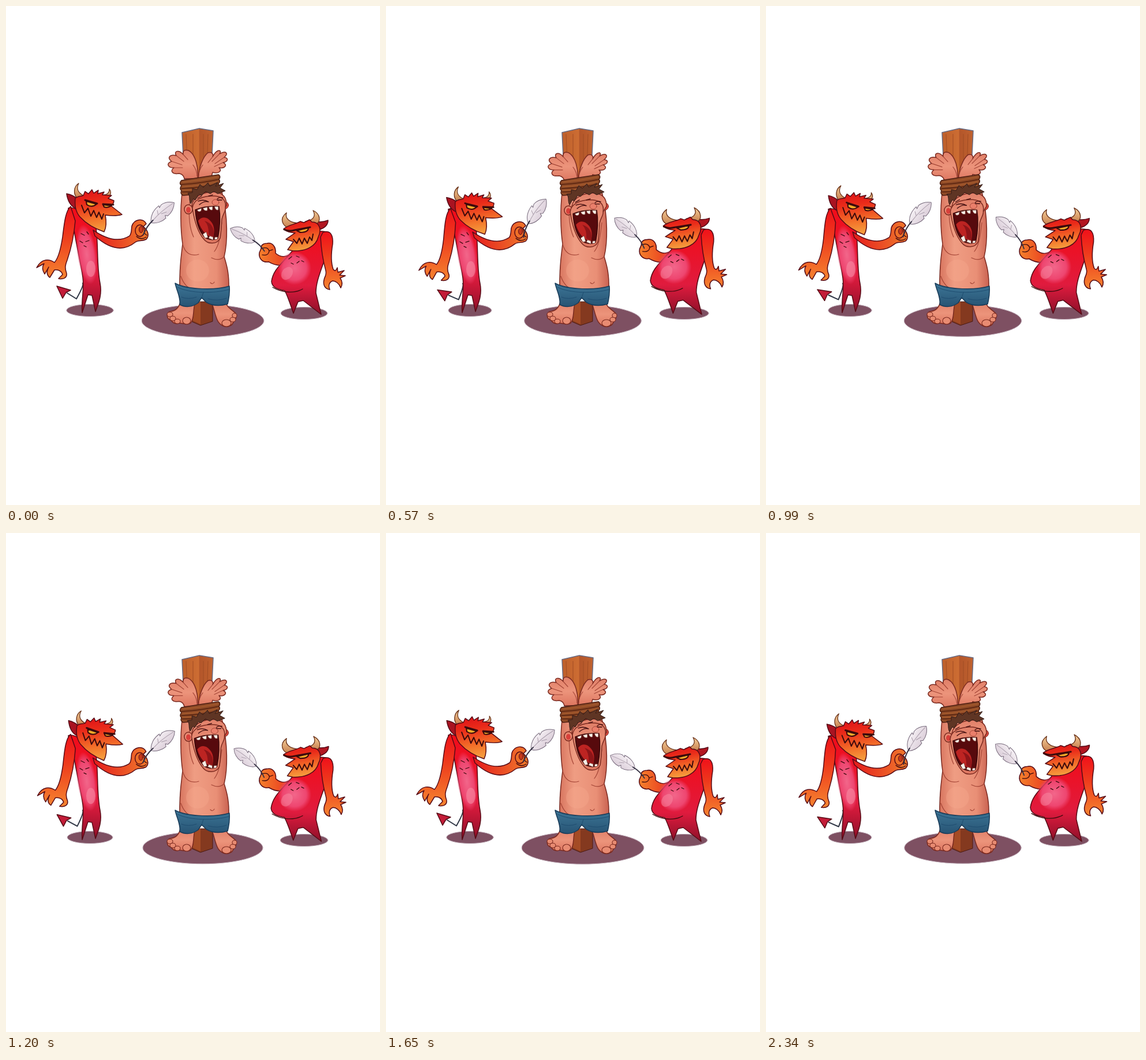
These frames come from a looping animation (648 by 864 pixels, 2.37 s). An HTML page:

```html
<!DOCTYPE html>
<html lang="en">
<head>
<meta charset="utf-8">
<title>Tickle</title>
<style>
html, body { margin: 0; width: 100%; height: 100%; overflow: hidden; background: #fff; }
svg { display: block; width: 648px; height: 864px; }
path, ellipse, circle { stroke-linejoin: round; stroke-linecap: round; }
.shadow { fill: #7e5062; stroke: #b9a3b0; stroke-width: 1; }
.red { stroke: #570b16; stroke-width: 1.5; }
.skin { fill: url(#skin); stroke: #7b2a20; stroke-width: 1.5; }
.crease { fill: none; stroke: #a54637; stroke-width: 1.2; }
.ink { fill: none; stroke: #3c0a0c; stroke-width: 2; }
.fine { stroke-width: 1.3; }
.bold { stroke-width: 3; }
.horn { fill: url(#horn); stroke: #683018; stroke-width: 1.3; }
.eye { fill: #f2a928; stroke: #37080c; stroke-width: 2; }
.tooth { fill: #f4eee6; stroke: #6d2b23; stroke-width: .7; }
.toe { fill: #e88b72; stroke: #7b2a20; stroke-width: 1.1; }
</style>
</head>
<body>
<svg viewBox="0 0 648 864">
<defs>
  <linearGradient id="skin" x2="0" y2="1"><stop stop-color="#e07f68"/><stop offset=".5" stop-color="#ec947b"/><stop offset="1" stop-color="#dd7660"/></linearGradient>
  <linearGradient id="torso"><stop stop-color="#d8755f"/><stop offset=".3" stop-color="#ef9d83"/><stop offset=".75" stop-color="#e98f76"/><stop offset="1" stop-color="#c96251"/></linearGradient>
  <linearGradient id="wood"><stop stop-color="#bd5f2b"/><stop offset=".54" stop-color="#cd6d33"/><stop offset=".56" stop-color="#b3562a"/><stop offset="1" stop-color="#c0622f"/></linearGradient>
  <linearGradient id="denim" x2="0" y2="1"><stop stop-color="#3c7596"/><stop offset="1" stop-color="#275474"/></linearGradient>
  <linearGradient id="body" x2="0" y2="1"><stop stop-color="#f20c18"/><stop offset=".65" stop-color="#e01b3e"/><stop offset="1" stop-color="#8c1029"/></linearGradient>
  <linearGradient id="limb" x2="0" y2="1"><stop stop-color="#f0101a"/><stop offset=".4" stop-color="#ee3a1c"/><stop offset="1" stop-color="#f58530"/></linearGradient>
  <linearGradient id="reach"><stop stop-color="#e51b1c"/><stop offset="1" stop-color="#f07a2c"/></linearGradient>
  <linearGradient id="reachBack"><stop stop-color="#f4802c"/><stop offset="1" stop-color="#e8321e"/></linearGradient>
  <linearGradient id="face" x2=".2" y2="1"><stop stop-color="#dc0e17"/><stop offset=".35" stop-color="#ea2c1a"/><stop offset=".75" stop-color="#f3722a"/><stop offset="1" stop-color="#f59a3c"/></linearGradient>
  <linearGradient id="horn" x2="0" y2="1"><stop stop-color="#f3cc98"/><stop offset="1" stop-color="#c67c4a"/></linearGradient>
  <linearGradient id="plume"><stop stop-color="#f5f0f4"/><stop offset="1" stop-color="#dccfda"/></linearGradient>
  <radialGradient id="glow"><stop stop-color="#f2668a"/><stop offset=".7" stop-color="#ee4670"/><stop offset="1" stop-color="#ee4670" stop-opacity="0"/></radialGradient>
  <g id="feather">
    <path fill="url(#plume)" stroke="#75687a" d="M-3,-17C-11,-24 -14,-36 -11,-48L-8,-46L-9,-52C-7,-60 0,-66 6,-69C12,-62 14,-52 12,-44L8,-42L12,-39C11,-30 5,-21 -1,-18Z"/>
    <path fill="none" stroke="#a99caa" d="M-3,-18Q-3,-42 5,-66M-2,-35L-8,-40M6,-48L1,-40"/>
    <path fill="none" stroke="#363244" stroke-width="2" d="M0,8Q-5,-6 -3,-22"/>
  </g>
</defs>

<ellipse id="shadowL" class="shadow" cx="145.5" cy="527" ry="10.5"/>
<ellipse id="shadowM" class="shadow" cx="341" cy="545"/>
<ellipse id="shadowR" class="shadow" cx="516.5" cy="532" ry="10.5"/>

<g id="boy">
  <path fill="url(#wood)" stroke="#686a82" stroke-width="1.5" d="M305,219L335,212L359,216L355,300L309,300Z"/>
  <path fill="none" stroke="#a04c24" d="M312,222L314,270M324,222V262M342,222V268M350,222L348,285"/>
  <path fill="#84391f" stroke="#4a1a12" d="M322,512H358V546L337,553L321,546Z"/>
  <path fill="#a44b25" d="M324,512H337V551L324,545Z"/>
  <path fill="url(#torso)" stroke="#7b2a20" stroke-width="1.5" d="M305,324C302,350 302,385 306,412C304,430 300,450 301,493C320,503 370,502 386,492C387,465 383,450 378,434C384,410 385,365 374,322Z"/>
  <path class="crease" d="M306,412C310,428 320,434 334,430M378,434C372,440 364,440 356,436M318,340C316,365 318,385 325,400M374,375C371,400 369,415 361,425M354,479Q358,483 361,478M303,468Q309,486 324,492"/>
  <ellipse cx="332" cy="458" rx="20" ry="19" fill="#f4a88d" opacity=".4"/>
  <g id="hands" class="skin">
    <path d="M332,300C334,280 328,257 316,251C309,249 306,252 307,258C299,249 290,252 295,260C284,257 278,264 287,270C277,273 280,281 291,281C283,287 289,293 300,291C306,292 308,295 309,300Z"/>
    <path d="M333,300C334,280 342,261 350,255C356,253 360,257 358,262C366,247 375,250 370,257C382,250 386,257 378,263C387,264 384,271 376,272C385,276 379,283 369,281C376,287 367,292 358,289L355,300Z"/>
    <path class="crease" d="M307,258L315,267M295,260L308,270M287,270L305,276M291,281L306,281M324,276Q331,285 331,296M358,262L350,272M370,257L357,270M378,263L362,274M376,272L361,279M341,276Q334,285 334,296"/>
  </g>
  <path fill="#8f4a27" stroke="#4b1e12" stroke-width="1.5" d="M304,302Q335,297 368,292Q373,295 369,300Q372,304 368,308Q371,313 367,318Q340,326 307,328Q301,325 304,320Q300,316 304,311Q299,307 304,302Z"/>
  <path fill="none" stroke="#56230f" stroke-width="1.6" d="M304,309Q338,307 369,300M304,316Q338,315 368,308M305,322Q340,322 368,314"/>
  <path fill="none" stroke="#b3652f" d="M306,305Q338,302 367,296M306,313Q338,311 367,304M306,319Q338,319 366,311"/>
  <path class="skin" d="M302,512H328C323,528 327,540 320,549C312,553 306,549 300,549C292,552 288,547 286,544C278,542 277,532 284,529C294,528 300,522 302,512Z"/>
  <path class="skin" d="M356,512H380C384,525 394,526 399,534C400,542 396,544 394,547C392,555 380,558 373,552C364,547 363,532 356,512Z"/>
  <g class="toe">
    <ellipse cx="284" cy="534" rx="5" ry="4"/><ellipse cx="289" cy="541" rx="5" ry="4"/><ellipse cx="297" cy="546" rx="5" ry="4"/><ellipse cx="313" cy="545" rx="7" ry="6"/>
    <ellipse cx="396" cy="536" rx="4" ry="4"/><ellipse cx="393" cy="543" rx="5" ry="4"/><ellipse cx="382" cy="549" rx="8" ry="6"/>
  </g>
  <path fill="url(#denim)" stroke="#193b58" stroke-width="1.5" d="M293,480C315,492 365,492 387,485C388,497 386,508 384,516C370,520 357,519 347,513L339,505L333,514C322,522 310,522 301,517C303,505 296,494 293,480Z"/>
  <path fill="none" stroke="#1f4d70" d="M297,487C320,498 360,498 386,491M342,496L339,505M304,504Q316,509 330,504M382,506Q366,512 350,507"/>
  <g id="hair">
    <circle cx="379" cy="345" r="6.5" fill="#d9493f" stroke="#7b2a20"/>
    <ellipse class="skin" cx="316" cy="352" rx="7" ry="8"/><ellipse cx="316" cy="353" rx="4" ry="5" fill="#d8403b"/>
    <path class="skin" d="M322,345C325,328 345,321 362,322C378,324 382,333 382,345L370,365L330,363Z"/>
  </g>
  <g id="face1">
    <path class="skin" d="M323,350C324,336 340,328 362,329C376,330 382,338 380,349C381,356 376,359 374,369C373,382 373,392 371,402C366,413 350,413 343,404C332,391 326,370 323,350Z"/>
    <path fill="#570a0d" stroke="#38080a" stroke-width="1.5" d="M328,353C340,348 355,346 369,347C372,365 370,387 367,402C360,406 349,405 343,399C332,386 329,370 328,353Z"/>
    <path fill="#bd2422" d="M333,372C340,363 349,366 354,372C361,379 362,389 359,400C349,399 338,390 333,372Z"/>
    <path fill="#8d1518" d="M344,372Q352,380 351,396L359,399C362,386 357,376 344,372Z"/>
    <path class="tooth" d="M331,353L339,350L338,355Q333,358 331,353ZM341,350L349,348L349,354Q344,356 341,350ZM351,348L358,347L358,353Q353,355 351,348ZM361,347L368,347L368,353Q363,355 361,347ZM341,395L347,391L350,401L345,402ZM351,402L353,398L359,400L359,405ZM361,404L362,400L367,400L366,404Z"/>
    <ellipse cx="363" cy="340" rx="6" ry="5" fill="#ea7f6b" stroke="#a54637"/>
    <path class="ink fine" d="M333,338Q342,334 351,339M335,344Q343,337 351,339M332,333L339,329M366,334Q370,330 376,332M366,336L374,336M351,329L358,327"/>
  </g>
  <path id="locks" fill="#5f3524" stroke="#321b18" d="M320,342C316,336 320,329 315,324L323,323L323,316L331,318L336,309L342,314L350,306L353,312L367,305L363,312L377,307L371,315L380,320L367,325L360,321L354,325L346,321L339,328L334,326L328,336L325,334Z"/>
</g>

<g id="slim">
  <g id="tail">
    <path fill="none" stroke="#303746" stroke-width="2" d="M133,480Q135,484 122,507L106,497"/>
    <path class="red" fill="#c31c38" d="M88,485L112,492L104,496L98,506Z"/>
  </g>
  <path class="red" fill="url(#body)" d="M108,350C120,345 150,368 156,385C160,410 157,450 163,480C167,500 160,515 155,529L149,501L142,500L132,531C130,510 136,490 133,470C129,440 118,400 116,372C112,362 108,358 108,350Z"/>
  <ellipse cx="140" cy="430" rx="17" ry="52" transform="rotate(-8 140 430)" fill="url(#glow)"/>
  <ellipse cx="147" cy="455" rx="8" ry="14" fill="#f78aa2" opacity=".6"/>
  <path class="ink fine" d="M130,394L136,397M140,391L143,395M128,407L133,410M138,408L144,406M135,415L139,417"/>
  <path id="armL" class="red" fill="url(#limb)" d="M112,347C103,355 101,375 98,400C95,420 91,436 84,444C75,438 62,436 53,453L66,446C62,452 63,458 67,464L74,452C70,460 70,466 76,470L84,457C92,456 97,460 98,465L91,472C100,474 106,470 105,463C102,455 102,450 106,440C113,420 118,395 120,372Z"/>
  <g id="reachL">
    <path class="red" fill="url(#reach)" d="M151,388C173,403 195,410 214,398C218,394 217,387 218,381C222,369 237,366 243,377L238,382C246,388 249,398 243,404C235,408 229,405 224,409C208,422 186,427 154,398Z"/>
    <ellipse cx="232" cy="389" rx="8" ry="10" fill="#ee6f28" stroke="#570b16" stroke-width="1.5"/>
    <ellipse cx="234" cy="387" rx="3.5" ry="5.5" fill="#c63a1d" stroke="#570b16"/>
    <path class="ink fine" d="M226,399Q234,406 243,400M239,393L244,397"/>
    <use id="featherL" href="#feather"/>
  </g>
  <g id="headL">
    <path class="red" fill="#a91321" d="M105,325Q116,327 124,334L120,350Q108,344 105,325Z"/>
    <path class="horn" d="M126,307C121,317 126,324 134,328L124,333C116,326 117,313 126,307Z"/>
    <path class="horn" d="M179,317C180,325 173,327 166,328L172,334C181,331 184,323 179,317Z"/>
    <path class="red" fill="url(#face)" d="M120,333C125,328 130,330 134,328L137,321L143,325L149,318L152,324L160,319L159,325L170,322L167,327L183,328L177,333L187,337C187,341 185,344 182,346L201,361C192,364 180,363 172,362C174,372 174,383 170,391C155,386 140,378 128,365C120,355 119,345 120,333Z"/>
    <path class="ink" d="M131,345L136,358L142,350L147,364L152,354L157,366L161,357L166,369L169,360"/>
    <path class="eye" d="M139,338L157,343Q149,350 140,344ZM168,344L183,346Q176,350 170,348Z"/>
    <path class="ink bold" d="M137,336L158,342M168,343L186,344"/>
  </g>
</g>

<g id="stout">
  <g id="reachR">
    <path class="red" fill="url(#reachBack)" d="M494,428C484,437 474,434 467,428C468,416 461,409 452,411C445,411 441,415 442,420L439,427C437,438 446,445 455,443C465,449 477,451 488,446Z"/>
    <path class="ink fine" d="M443,420Q453,416 456,424Q455,433 444,431M456,424L462,422"/>
    <use id="featherR" href="#feather"/>
  </g>
  <path class="red" fill="url(#body)" d="M496,424C510,400 540,383 560,393C567,400 556,425 550,445C541,470 537,482 537,497L546,534L515,510L506,512L498,532C492,515 488,502 483,493C472,491 461,488 460,477C463,455 480,445 496,424Z"/>
  <ellipse cx="500" cy="454" rx="29" ry="29" fill="url(#glow)"/>
  <ellipse cx="487" cy="463" rx="9" ry="12" transform="rotate(35 487 463)" fill="#f78aa2" opacity=".5"/>
  <path class="ink fine" d="M462,487C478,497 500,498 514,490M490,438L495,434M503,433L508,435M512,441L516,443M504,445L508,442M494,445L498,447"/>
  <path class="red" fill="url(#limb)" d="M549,392C563,387 567,398 566,412C563,430 563,445 567,456C570,460 572,458 574,453L575,461L586,458L578,466L588,467L579,471C583,477 583,483 580,488C577,480 571,476 566,476C560,478 558,484 561,491C552,490 549,482 551,474C552,468 556,466 554,458C549,440 546,420 545,400Z"/>
  <g id="headR">
    <path class="red" fill="#b21621" d="M537,373Q548,375 558,371Q558,382 544,387Z"/>
    <path class="horn" d="M486,358C483,368 491,375 506,376L493,385C478,382 473,368 486,358Z"/>
    <path class="horn" d="M532,354C538,365 531,371 519,373L535,379C547,374 545,360 532,354Z"/>
    <path class="red" fill="url(#face)" d="M481,386C490,378 500,379 510,373L516,375L526,370L530,374C544,374 547,388 541,400C537,416 520,425 497,424L488,422L498,408L485,404L501,393C492,392 486,391 481,386Z"/>
    <path class="ink" d="M498,404L504,411L508,402L513,412L517,402L522,411L526,400L530,406L532,395"/>
    <path class="eye" d="M504,389L524,384Q524,392 510,392Z"/>
    <path class="ink bold" d="M482,387Q490,391 500,388L527,383"/>
  </g>
</g>
</svg>
<script>
const LOOP = 2370, STEP = 30, PERIOD = 1680;
const el = id => document.getElementById(id);
const move = (id, transform) => el(id).setAttribute('transform', transform);
const scaleAt = (x, y, sx, sy) => `translate(${x} ${y}) scale(${sx} ${sy}) translate(${-x} ${-y})`;

function draw(time) {
  const t = Math.floor(time % LOOP / STEP) * STEP;
  const wave = peak => Math.cos(2 * Math.PI * (t - peak) / PERIOD);
  const w = wave(1580);
  const breath = w * (1.5 - .5 * w * w); // lingers at both ends
  const sink = (1 - breath) / 2;

  el('shadowL').setAttribute('rx', 39 + 1.7 * breath);
  el('shadowR').setAttribute('rx', 41.5 - 1.2 * breath);
  el('shadowM').setAttribute('rx', 103.5 + 2.3 * breath);
  el('shadowM').setAttribute('ry', 27.7 + .5 * breath);

  move('hands', `translate(0 ${4 * sink - 1})`);
  move('hair', `translate(0 ${2 * sink})`);
  move('locks', `translate(${-2 * sink} ${2 * sink})`);
  move('face1', `translate(${-4 * sink} ${7 * sink})`);

  move('slim', scaleAt(0, 530, 1, 1 - .01 * sink));
  move('tail', `rotate(${-8 * sink} 133 480)`);
  move('armL', `translate(0 ${2 * sink}) rotate(${-2.3 * sink} 108 355)`);
  move('reachL', `translate(${-sink} ${2 * sink})`);
  move('headL', `translate(${sink} ${3.5 * sink}) rotate(${2.6 * (wave(1200) + .2)} 150 378)`);
  move('featherL', `translate(243 390) rotate(${34.5 + 9 * wave(1410)})`);

  move('stout', scaleAt(517, 535, 1 + .035 * sink, 1 + .03 * sink));
  move('reachR', `translate(${3 * sink} ${-3 * sink})`);
  move('headR', `rotate(${1.5 * sink} 515 410)`);
  move('featherR', `translate(442 420) rotate(${-44 - 8 * wave(1690)}) scale(-.92 .92)`);
}

function tick(now) {
  draw(now);
  requestAnimationFrame(tick);
}
draw(0);
requestAnimationFrame(tick);
</script>
</body>
</html>
```
